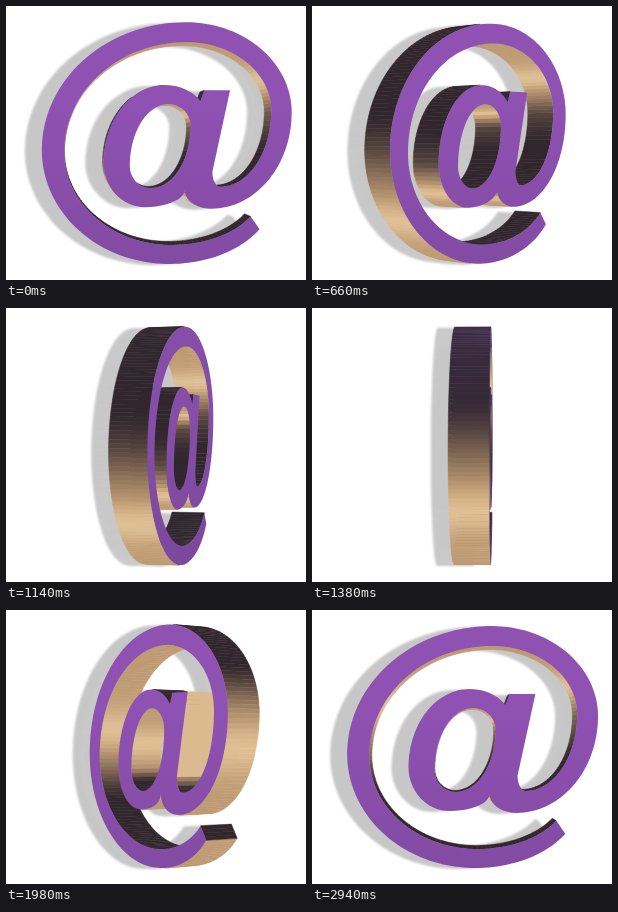
An HTML page with a canvas for the animation above (3 s loop, 300 px wide and 274 px high).

```html
<!DOCTYPE html>
<html lang="en">
<head>
<meta charset="utf-8">
<title>Turning at sign</title>
<style>
html, body { margin: 0; width: 100%; height: 100%; overflow: hidden; background: #fff; }
canvas { display: block; width: 300px; height: 274px; }
</style>
</head>
<body>
<canvas id="stage" width="300" height="274"></canvas>
<script>
const W = 300, H = 274, LOOP = 3000, STEP = 60;
const CX = 161, CY = 137, DEPTH = 36, EYE = 1000, SCALE = 0.982;
const DARK = [48, 38, 44], TAN = [190, 153, 113], GLOW = [232, 200, 156];
const PURPLE = [143, 81, 178], DUSK = [76, 52, 104];

const ctx = document.getElementById('stage').getContext('2d');
const layer = document.createElement('canvas');
layer.width = W;
layer.height = H;
const g = layer.getContext('2d');

const lerp = (a, b, k) => a + (b - a) * k;
const mix = (a, b, k) => a.map((v, i) => lerp(v, b[i], k));
const css = c => `rgb(${c.map(Math.round).join(',')})`;
const smooth = (a, b, v) => {
  const k = Math.max(0, Math.min(1, (v - a) / (b - a)));
  return k * k * (3 - 2 * k);
};

// Ways to reach a key point: straight, or along an elliptic arc that is level at one end.
const line = (x, y) => ({ x, y, at: (a, b, k) => [lerp(a.x, b.x, k), lerp(a.y, b.y, k)] });
const arc = (a, b, k, span) => {
  const m = span * Math.PI / 180;
  return [
    lerp(a.x, b.x, Math.sin(k * m) / Math.sin(m)),
    lerp(a.y, b.y, (1 - Math.cos(k * m)) / (1 - Math.cos(m)))
  ];
};
const side = (x, y, span = 90) => ({ x, y, at: (a, b, k) => arc(a, b, k, span) });
const flat = (x, y, span = 90) => ({ x, y, at: (a, b, k) => arc(b, a, 1 - k, span) });

const BODY = [
  line(253, 224),
  flat(163, 258, 60), side(35, 144), flat(180, 16), side(286, 106), flat(204, 203),
  side(177, 184), flat(137, 201), side(96, 157), flat(157, 79), side(193, 95, 60),
  line(197, 84), line(223, 84), line(205, 166),
  flat(213, 181), side(265, 104), flat(180, 36), side(57, 146), flat(165, 239),
  side(244, 211, 60)
];
const HOLE = [flat(143, 182), side(183, 120), flat(161, 98), side(122, 160)];

function sample(keys) {
  return keys.flatMap((b, i) => {
    const a = keys[(i + keys.length - 1) % keys.length];
    const n = Math.ceil(Math.hypot(b.x - a.x, b.y - a.y) / 4);
    return Array.from({ length: n }, (_, j) => {
      const [x, y] = b.at(a, b, (j + 1) / n);
      return [(x - CX) * SCALE, (y - CY) * SCALE];
    });
  });
}

const shapes = [sample(BODY), sample(HOLE)];

// Polished metal: dark facing up, tan facing down, with a bright band between.
function metal(lean) {
  const base = mix(DARK, TAN, smooth(-0.4, 0.55, lean));
  return mix(base, GLOW, 0.8 * Math.exp(-(((lean - 0.6) / 0.17) ** 2)));
}

function trace(pts) {
  pts.forEach((p, i) => i ? g.lineTo(p[0], p[1]) : g.moveTo(p[0], p[1]));
  g.closePath();
}

function solid(deg) {
  const a = deg * Math.PI / 180, c = Math.cos(a), s = Math.sin(a);
  const edge = smooth(68, 95, Math.abs(deg));
  const shift = 0.14 - 0.2 * Math.tanh(deg / 15) + 0.2 * edge;
  const project = ([x, y], z) => {
    const depth = z * c - x * s, k = EYE / (EYE - depth);
    return [CX + (x * c + z * s) * k, CY + y * k, depth];
  };
  const walls = [], faces = [];

  for (const pts of shapes) {
    const front = pts.map(p => project(p, DEPTH / 2));
    const back = pts.map(p => project(p, -DEPTH / 2));
    faces.push(front);
    pts.forEach(([x, y], i) => {
      const j = (i + 1) % pts.length;
      const dx = pts[j][0] - x, dy = pts[j][1] - y, len = Math.hypot(dx, dy);
      const nx = dy / len, ny = -dx / len;
      if (nx * (-EYE * s - x) - ny * y <= 0) return;
      const tone = mix(metal(ny + shift * (1 - ny * ny)), DUSK, edge * 0.5 * Math.max(0, -ny));
      walls.push({ quad: [front[i], front[j], back[j], back[i]], z: front[i][2] + back[j][2], fill: css(tone) });
    });
  }

  g.clearRect(0, 0, W, H);
  g.lineWidth = 0.5;
  g.lineJoin = 'round';
  walls.sort((m, n) => m.z - n.z);
  for (const w of walls) {
    g.fillStyle = g.strokeStyle = w.fill;
    g.beginPath();
    trace(w.quad);
    g.fill();
    g.stroke();
  }

  const top = mix(PURPLE, DUSK, edge);
  const shade = g.createLinearGradient(0, 100, 0, 260);
  shade.addColorStop(0, css(top));
  shade.addColorStop(1, css(mix(top, DUSK, 0.2)));
  g.fillStyle = shade;
  g.beginPath();
  faces.forEach(trace);
  g.fill('evenodd');
}

function draw(now) {
  const i = Math.floor((now % LOOP) / STEP);
  let deg = 3.6 * (i + 1) + 1.8;
  if (deg > 90) deg -= 180;
  solid(deg);

  ctx.fillStyle = '#fff';
  ctx.fillRect(0, 0, W, H);
  ctx.save();
  ctx.shadowColor = 'rgba(0,0,0,0.22)';
  ctx.shadowBlur = 2;
  ctx.shadowOffsetX = -17;
  ctx.shadowOffsetY = 1;
  ctx.drawImage(layer, 0, 0);
  ctx.restore();
}

const start = performance.now();
function tick() {
  draw(performance.now() - start);
  requestAnimationFrame(tick);
}
tick();
</script>
</body>
</html>
```
